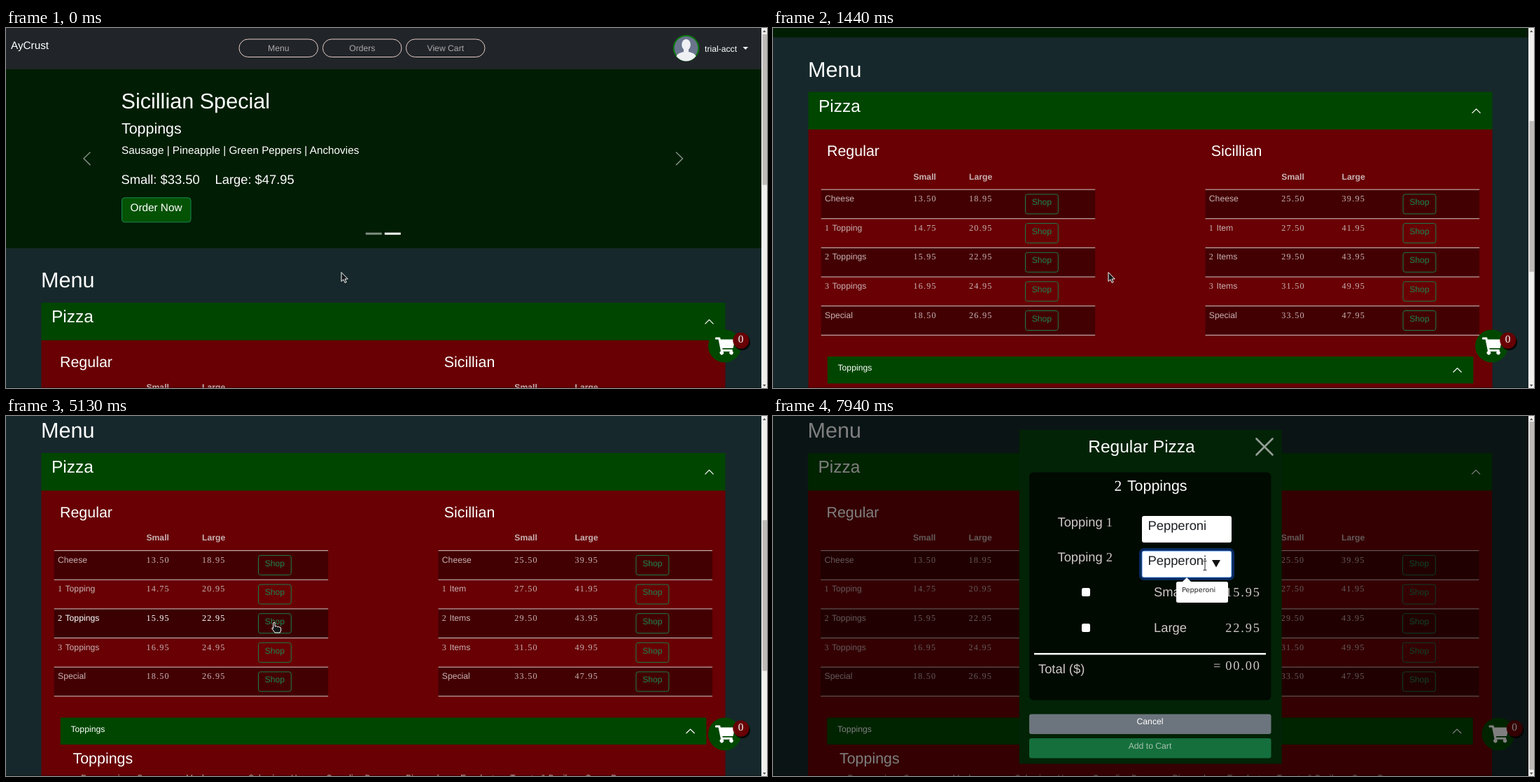
Animation, 1087 px wide and 515 px high, one loop 8000 ms. Source, as an HTML page:

```html
<!DOCTYPE html>
<html lang="en">
<head>
<meta charset="utf-8">
<title>Pizza menu</title>
<style>
html, body { margin: 0; width: 100%; height: 100%; overflow: hidden; background: #16282b; }
svg { display: block; width: 1087px; height: 515px; font-family: "Liberation Sans", Arial, sans-serif; }
text { white-space: pre; text-rendering: geometricPrecision; }
.num { font-family: "Liberation Serif", "Times New Roman", serif; letter-spacing: .1em; }
.tip { font-family: "DejaVu Sans", sans-serif; }
.row text { fill: #c8b1b2; }
.row .shop { fill: #1d8450; }
.row rect.bg { fill: none; }
.row.odd rect.bg { fill: #430002; }
.row.hot rect.bg { fill: #500003; }
.row.odd.hot rect.bg { fill: #3a0002; }
.row.hot text:not(.shop) { fill: #fff; }
</style>
</head>
<body>
<svg id="stage" viewBox="0 0 1087 515"></svg>
<script>
const LOOP = 8000, TICK = 62.5;
const GREEN = '#004600', RED = '#680004', SOFT = '#c8b1b2', LABEL = '#cfc7c7';

// Drawing helpers
const digits = s => s.replace(/[\d.=]*\d[\d.]*|=/g, m => `<tspan class="num">${m}</tspan>`);
const text = (x, y, size, s, fill = '#fff', attrs = '') =>
  `<text x="${x}" y="${y}" font-size="${size}" fill="${fill}" ${attrs}>${s}</text>`;
const mid = (x, y, size, s, fill, attrs = '') =>
  text(x, y, size, s, fill, 'text-anchor="middle" ' + attrs);
const box = (x, y, w, h, fill, r = 0, attrs = '') =>
  `<rect x="${x}" y="${y}" width="${w}" height="${h}" rx="${r}" fill="${fill}" ${attrs}/>`;
const line = (d, stroke, width, attrs = '') =>
  `<path d="${d}" fill="none" stroke="${stroke}" stroke-width="${width}" ${attrs}/>`;
const shape = (d, fill, attrs = '') => `<path d="${d}" fill="${fill}" ${attrs}/>`;
const group = (id, body, attrs = '') => `<g id="${id}" ${attrs}>${body}</g>`;

function navBar() {
  const pills = [[333, 'Menu'], [452.5, 'Orders'], [571.5, 'View Cart']].map(([x, s]) =>
    box(x, 16, 112.5, 25.5, 'none', 12.7, 'stroke="#e9cbc6"') + mid(x + 56.3, 33, 12.2, s, '#aaa7a9'));
  return box(0, 0, 1087, 59, '#212529') + text(7, 29.5, 15.3, 'AyCrust') + pills.join('') +
    '<circle cx="971.5" cy="28.7" r="17.8" fill="#69748c" stroke="#0b780f" stroke-width="2"/>' +
    '<ellipse cx="971.5" cy="24" rx="6.3" ry="8" fill="#eef0f3"/>' +
    shape('M968 29h7v5q9 2 10.5 6.2a17 17 0 0 1-28 0q1.5-4.2 10.5-6.2z', '#eef0f3') +
    text(998, 33.5, 12.2, 'trial-acct') + shape('M1052.5 27h7.6l-3.8 4z', '#fff');
}

function carousel() {
  const dim = '#7f8e81';
  return box(0, 59, 1087, 256, '#011d03') +
    text(164.5, 115, 30.6, 'Sicillian Special') +
    text(165, 151, 21.4, 'Toppings') +
    text(165, 180, 15.3, 'Sausage | Pineapple | Green Peppers | Anchovies') +
    text(164.5, 223, 18.35, 'Small: $33.50') + text(298.5, 223, 18.35, 'Large: $47.95') +
    box(165.5, 242.8, 98.5, 35, '#045204', 4, 'stroke="#198754"') +
    mid(214.5, 262, 15.3, 'Order Now') +
    line('M120.5 177.5l-9.5 9.3l9.5 9.3', dim, 1.5) +
    line('M957 177.5l9.5 9.3l-9.5 9.3', dim, 1.5) +
    box(513.7, 292.7, 23, 3, dim) + box(540.8, 292.7, 23, 3, '#fff');
}

function table(x, title, cols, shopX, rows) {
  const top = 532.6, step = 41.65, rule = y => box(x, y - .5, 391.5, 1, '#d8c6c6');
  const body = rows.map(([name, small, large], i) => {
    const y = top + i * step;
    return `<g class="row ${i % 2 ? '' : 'odd'}">` + box(x, y, 391.5, step, 'none', 0, 'class="bg"') +
      text(x + 5.3, y + 17, 12.2, digits(name)) +
      text(cols[0], y + 17, 12.2, digits(small)) + text(cols[1], y + 17, 12.2, digits(large)) +
      box(shopX, y + 6.8, 46.8, 28, 'none', 3, 'stroke="#1a7c4c"') +
      mid(shopX + 23.4, y + 22, 12.2, 'Shop', '', 'class="shop"') + '</g>' + rule(y);
  });
  return text(x + 8.3, 484.5, 21.4, title) +
    text(cols[0], 518, 12.2, 'Small', SOFT, 'font-weight="bold"') +
    text(cols[1], 518, 12.2, 'Large', SOFT, 'font-weight="bold"') +
    body.join('') + rule(top + rows.length * step);
}

function menu() {
  const list = [[107, 'Pepperoni'], [187, 'Sausage'], [257, 'Mushrooms'], [346, 'Salami'], [407, 'Ham'],
    [457, 'Canadian Bacon'], [571, 'Pineapple'], [649, 'Eggplant'], [720, 'Tomato &amp; Basil'], [827, 'Green Peppers']];
  return text(50, 371, 30.6, 'Menu') +
    box(50.5, 446, 977, 460, RED) + box(50.5, 393, 977, 53.7, GREEN) +
    text(65, 421, 24.5, 'Pizza') + line('M998.5 423.3l6-6l6 6', '#fff', 1.2) +
    group('left', table(68.7, 'Regular', [200.4, 280], 360.5, [
      ['Cheese', '13.50', '18.95'], ['1 Topping', '14.75', '20.95'], ['2 Toppings', '15.95', '22.95'],
      ['3 Toppings', '16.95', '24.95'], ['Special', '18.50', '26.95']])) +
    table(617.5, 'Sicillian', [726.3, 812.5], 900, [
      ['Cheese', '25.50', '39.95'], ['1 Item', '27.50', '41.95'], ['2 Items', '29.50', '43.95'],
      ['3 Items', '31.50', '49.95'], ['Special', '33.50', '47.95']]) +
    box(358.8, 621.2, 50, 31, 'none', 4.5, 'id="shopRing" stroke="#198754" stroke-opacity=".5" stroke-width="2.5"') +
    box(77.8, 771.5, 922.5, 38.5, GREEN) + text(92.5, 791.5, 12.2, 'Toppings') +
    line('M971.5 794l6-6l6 6', '#fff', 1.2) + text(95.5, 836.5, 21.4, 'Toppings') +
    list.map(([x, s]) => text(x, 862, 12.2, s)).join('');
}

const cartIcon = 'M24 0H127q20 0 23 19l9 45H552q26 3 23 29l-47 208q-5 19-23 19H212l6 32H487q26 3 23 29' +
  'l-6 25a56 56 0 1 1-73 10H231a56 56 0 1 1-67-8L94 64H24q-24 0-24-24V24Q0 0 24 0z';

const cart = () =>
  '<circle cx="1026.5" cy="455" r="23.5" fill="#004800"/>' +
  shape(cartIcon, '#fff', 'transform="translate(1013 442.5) scale(.0487)"') +
  '<circle cx="1051.5" cy="449.5" r="11.5" fill="#080808"/><circle cx="1049.8" cy="447" r="11.5" fill="#680004"/>' +
  mid(1049.5, 449.5, 15.3, '0', '#fff', 'style="font-family:Liberation Serif,serif"');

const scrollBar = (id, y, h) =>
  box(1079, 0, 8, 515, '#f1efee') + box(1080.5, y, 6.5, h, '#bdbab8', 0, `id="${id}"`) +
  shape('M1081 6h4.5l-2.2-3z', '#555') + shape('M1081 510h4.5l-2.2 3z', '#555');

function dialog() {
  const price = (y, name, value) => box(441, y - 11.5, 12, 12, '#fff', 2.5) +
    text(544, y, 18.35, name, LABEL) + text(646.3, y, 18.35, digits(value), LABEL);
  return box(351.7, 20, 375, 477.5, '#022306') +
    mid(526.5, 52, 24.5, 'Regular Pizza') +
    line('M690.5 32.5l23 23m0-23l-23 23', '#959f97', 2.6, 'stroke-linecap="round"') +
    box(366, 80.5, 345.5, 326, '#000a01', 6) +
    text(487.5, 107, 21.4, digits('2 Toppings')) +
    text(406.5, 157.5, 18.35, digits('Topping 1'), LABEL) +
    text(406.5, 207.5, 18.35, digits('Topping 2'), LABEL) +
    box(527, 143, 128, 38, '#fff', 3) + text(535.5, 163, 18.35, 'Pepperoni', '#1c2024') +
    box(525, 191, 132, 42, 'none', 5, 'id="ring" stroke="#072a60" stroke-width="4"') +
    box(527, 193, 128, 38, '#fff', 3) +
    box(527.3, 193.3, 127.4, 37.4, 'none', 3, 'id="edge" stroke="#86b7fe"') +
    text(535.5, 212.5, 18.35, 'Pepperoni', '#1c2024') +
    shape('M627 206h12l-6 10.5z', '#111', 'id="arrowDown"') +
    box(615, 198, 1, 26, '#111', 0, 'id="caret"') +
    price(257.5, 'Small', '15.95') + price(308.5, 'Large', '22.95') +
    box(373, 339, 331, 2.5, '#fff') + text(379, 368, 18.35, 'Total ($)', LABEL) +
    text(629, 362.5, 18.35, digits('='), LABEL) + text(646.3, 362.5, 18.35, digits('00.00'), LABEL) +
    box(366, 426.5, 345.5, 28.5, '#6c757d', 3) + mid(538.5, 441, 12.2, 'Cancel') +
    box(366, 461, 345.5, 28.5, '#156f3c', 3) + mid(538.5, 476, 12.2, 'Add to Cart', '#a7c2b0') +
    group('popup', shape('M584 238l7-7l7 7z', '#fff') + box(576, 237, 74, 30, '#fff', 2.5) +
      text(584, 252, 9.7, 'Pepperoni', '#222', 'class="tip"'));
}

const beam = 'M-2.5-6.5h5M0-6.5v13M-2.5 6.5h5';
const pointers =
  group('arrow', shape('M.5.5v13l3-2.7l2.2 4.7l2-1l-2.1-4.5h4.2z', '#15181a', 'stroke="#fff"')) +
  group('hand', shape('M.5 1q1.5-1.5 2.5 0v5q3-1 3.5.6q2.5-.6 3 .6q2-.3 2 1.5v3.3l-1.5 3h-7l-4.5-6q.5-2 2 0z',
    '#15181a', 'stroke="#fff" stroke-linejoin="round"')) +
  group('beam', line(beam, '#fff', 2.6) + line(beam, '#333', 1.1));

document.getElementById('stage').innerHTML = box(0, 0, 1087, 515, '#16282b') +
  group('page', navBar() + carousel() + menu()) +
  box(0, 514, 1087, 1, '#000', 0, 'opacity=".4"') +
  group('cart', cart()) + group('pageBar', scrollBar('thumb', 9, 215.5)) +
  box(0, 0, 1087, 515, '#000', 0, 'id="shade"') +
  group('modal', group('dialog', dialog()) + scrollBar('modalThumb', 8, 498)) + pointers;

const el = {};
document.querySelectorAll('[id]').forEach(e => el[e.id] = e);
const leftRows = [...document.querySelectorAll('#left .row')];
const show = (e, on) => e.setAttribute('display', on ? 'inline' : 'none');
const move = (e, x, y) => e.setAttribute('transform', `translate(${x} ${y})`);
const ramp = (t, from, span) => Math.min(1, Math.max(0, (t - from) / span));

// time, offset, speed
const SCROLL = [[930, 0, .5], [1187.5, 173, .62], [1437.5, 301.5, .33], [1687.5, 340, 0]];
function scrollAt(t) {
  if (t <= SCROLL[0][0]) return 0;
  for (let i = 1; i < SCROLL.length; i++) {
    const [t0, y0, v0] = SCROLL[i - 1], [t1, y1, v1] = SCROLL[i];
    if (t > t1) continue;
    const d = t1 - t0, u = (t - t0) / d, w = 1 - u;
    return w * w * ((1 + 2 * u) * y0 + u * d * v0) + u * u * ((3 - 2 * u) * y1 - w * d * v1);
  }
  return 340;
}

// start, end, target x, target y
const MOVES = [[2000, 2500, 382, 281], [2625, 2812.5, 382, 296], [5875, 6562.5, 617, 214]];
function pointerAt(t) {
  let x = 478.5, y = 349;
  for (const [a, b, tx, ty] of MOVES) {
    const u = ramp(t, a, b - a), k = u * u * (3 - 2 * u);
    x += (tx - x) * k;
    y += (ty - y) * k;
  }
  return [x, y];
}

function render(t) {
  const open = t >= 5180, scroll = scrollAt(t), [x, y] = pointerAt(t);
  move(el.page, open ? -.5 : 0, -scroll);
  move(el.cart, open ? 9.5 : 0, 0);
  el.thumb.setAttribute('y', 9 + scroll * .412);
  show(el.pageBar, !open);
  show(el.shopRing, open);
  el.shade.setAttribute('opacity', .5 * ramp(t, 5170, 150));

  const hot = !open && x >= 69 && x <= 460 ? Math.floor((y + scroll - 532.6) / 41.65) : -1;
  leftRows.forEach((r, i) => r.classList.toggle('hot', i === hot));

  el.modal.setAttribute('opacity', ramp(t, 5335, 150));
  show(el.modal, t > 5335);
  move(el.dialog, 0, -38.2 * Math.pow(1 - ramp(t, 5335, 300), 1.65));

  const inField = open && x > 527 && x < 655 && y > 193 && y < 231;
  const focus = ramp(t, 7250, 200);
  show(el.arrowDown, inField);
  el.ring.setAttribute('opacity', focus);
  el.edge.setAttribute('opacity', focus);
  show(el.popup, t >= 7430);
  show(el.caret, t >= 7430 && t < 7930);

  const pressing = t >= 5120 && t < 5240;
  show(el.hand, pressing);
  show(el.beam, inField);
  show(el.arrow, !pressing && !inField);
  move(el.hand, x - .8, y - 1);
  move(el.beam, x, y);
  move(el.arrow, x, y);
}

function frame() {
  const t = performance.now() % LOOP;
  render(Math.floor((t + 4) / TICK) * TICK);
  requestAnimationFrame(frame);
}
frame();
</script>
</body>
</html>
```
